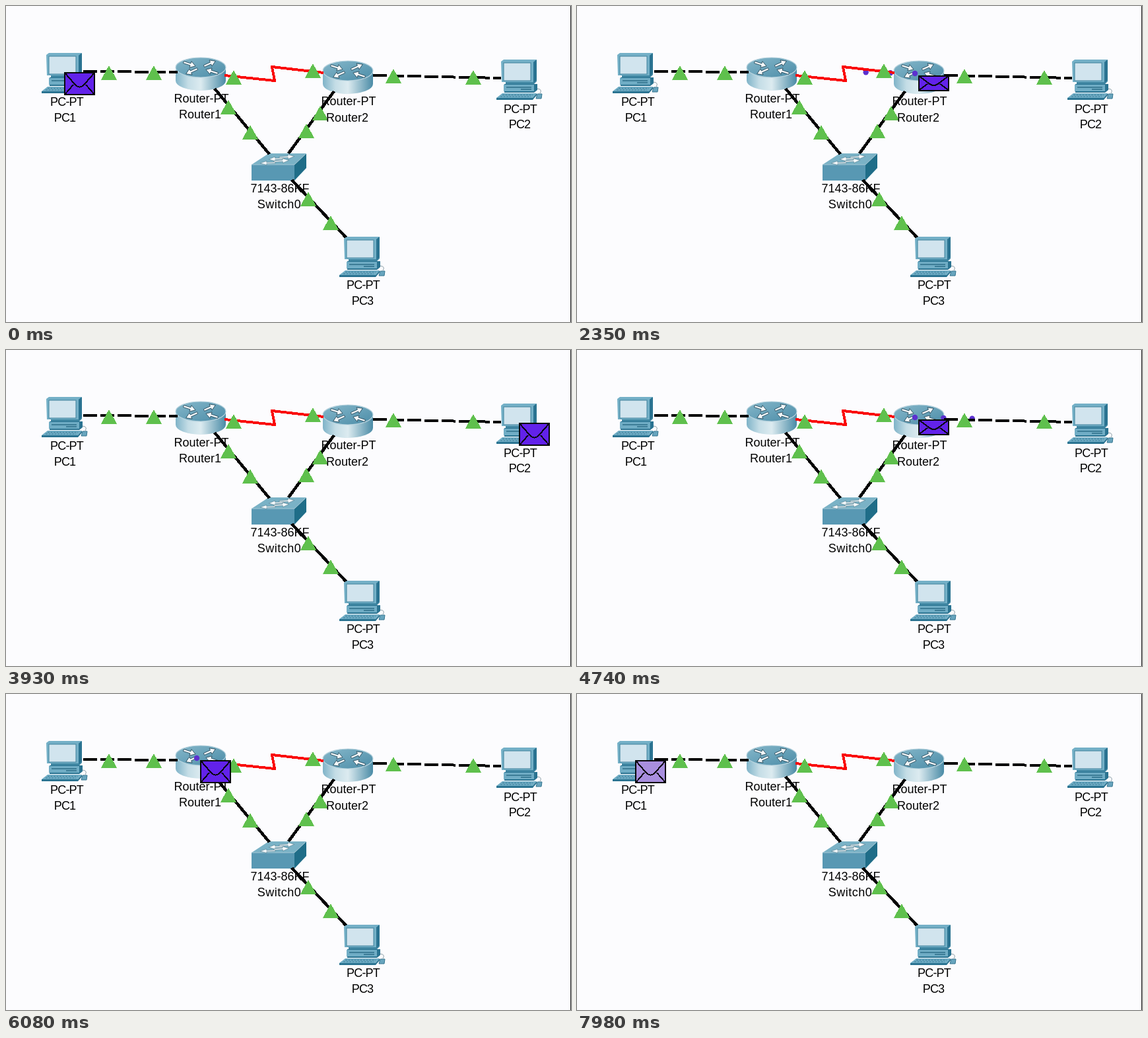
These frames come from a looping animation (856x478 px, 8000 ms). An HTML page:

```html
<!DOCTYPE html>
<html lang="en">
<head>
<meta charset="utf-8">
<title>Packet trip</title>
<style>
html, body { margin: 0; width: 100%; height: 100%; overflow: hidden; background: #fcfcfe; }
svg { display: block; width: 856px; height: 478px; }
text { font: 18px "Liberation Sans", Arial, sans-serif; text-anchor: middle; fill: #000; }
.pc { letter-spacing: -.8px; }
.wide { letter-spacing: .5px; }
.crisp { shape-rendering: crispEdges; }
.cable { fill: none; stroke: #000; stroke-width: 4.5; }
.dashed { stroke-width: 4; stroke-dasharray: 21 5; }
.serial { stroke: #fa0808; stroke-width: 4; }
.ink { stroke: #08080c; stroke-width: 2; }
#ghost { fill: #fff; stroke-dasharray: 3 3; }
#letter path { vector-effect: non-scaling-stroke; }
#leds { fill: #5fc04d; }
#dots { fill: #5c30cf; }
</style>
</head>
<body>
<svg viewBox="0 0 856 478">
  <defs>
    <linearGradient id="metal">
      <stop offset="0" stop-color="#7fb3c8"/>
      <stop offset=".25" stop-color="#c4dde6"/>
      <stop offset=".5" stop-color="#dcebf0"/>
      <stop offset="1" stop-color="#4a8ba6"/>
    </linearGradient>
    <linearGradient id="lid" x2="1" y2="1">
      <stop offset="0" stop-color="#85b7ca"/>
      <stop offset="1" stop-color="#4c8da8"/>
    </linearGradient>

    <g id="pc">
      <path fill="#3f86a2" d="M8 1H54V33L49 38H7V30Z"/>
      <path fill="#74b0c7" d="M0 3L4 0H54L49 4V34H1Z"/>
      <path fill="#2a7391" d="M49 4L54 0V31L49 35Z"/>
      <rect x="4" y="5" width="41" height="27" fill="#d1e4ee" stroke="#3f819c"/>
      <path fill="#2a7391" d="M5 37H55V46L50 50H5Z"/>
      <path fill="#70adc5" d="M4 38H50V48H4Z"/>
      <path d="M8 42H46M30 45H46" stroke="#2d6d89" stroke-width="1.5"/>
      <path fill="#70adc5" d="M2 51H54L48 58H-7Z"/>
      <path fill="#2a7391" d="M-7 58H48L54 51V54L48 61H-7Z"/>
      <path d="M2 53.5H48M-1 56H45" stroke="#3b7c98" stroke-dasharray="3 1.5"/>
      <path d="M55 44Q63 45 59 51" fill="none" stroke="#8a9da6"/>
      <path fill="#68a5be" stroke="#34748f" d="M55 52H62L61 59H53Z"/>
    </g>

    <path id="arrow" d="M0 -1.6H11V-5L19 0L11 5V1.6H0Z"/>

    <g id="router">
      <path fill="url(#metal)" d="M-38 0V20A38 15 0 0 0 38 20V0Z"/>
      <ellipse rx="38" ry="15" fill="url(#lid)" stroke="#b8d3de" stroke-width="1.2"/>
      <g fill="#f4f8fa" stroke="#26495a" stroke-width=".8">
        <use href="#arrow" transform="translate(-26 -8) rotate(18)"/>
        <use href="#arrow" transform="translate(26 9) rotate(198)"/>
        <use href="#arrow" transform="translate(5 -2) rotate(-24)"/>
        <use href="#arrow" transform="translate(-5 2) rotate(156)"/>
      </g>
    </g>

    <g id="switch">
      <path fill="#7ab2c6" d="M372 240L398 223H455L437 240Z"/>
      <path fill="#5898b3" d="M372 240H437V264H372Z"/>
      <path fill="#1f6d88" d="M437 240L455 223V245L437 264Z"/>
      <path d="M372 240H437L455 223" fill="none" stroke="#a5c8d5"/>
      <g fill="#f4f8fa" stroke="#4a7688" stroke-width=".6">
        <use href="#arrow" transform="translate(414 229) rotate(-4) scale(1.2 .7)"/>
        <use href="#arrow" transform="translate(421 231) rotate(178) scale(1.2 .7)"/>
        <use href="#arrow" transform="translate(406 235) rotate(-4) scale(1.2 .7)"/>
        <use href="#arrow" transform="translate(408 237) rotate(178) scale(1.2 .6)"/>
      </g>
    </g>

    <g id="letter">
      <path d="M1 1H46V34H1Z"/>
      <path fill="none" d="M1 1L15 17Q23.5 28 32 17L46 1M1 34L14 19M46 34L33 19"/>
    </g>
  </defs>

  <rect width="856" height="478" fill="#fcfcfe"/>
  <path d="M855.5 0V478" stroke="#222"/>

  <use href="#pc" x="61" y="71"/>
  <use href="#pc" x="750" y="81"/>
  <use href="#pc" x="512" y="349"/>
  <use href="#router" x="295" y="93"/>
  <use href="#router" x="518" y="98"/>
  <use href="#switch"/>

  <g id="dots"></g>

  <g class="crisp">
    <path class="cable dashed" d="M117 99L260 100"/>
    <path class="cable dashed" d="M556 105L750 109"/>
    <path class="cable serial" d="M331 105L407 113L403 92L481 101"/>
    <path class="cable" d="M316 125L399 224"/>
    <path class="cable" d="M497 129L428 223"/>
    <path class="cable" d="M433 263L515 350"/>
    <g id="leds"></g>
  </g>
  <g id="labels"></g>

  <g id="solid" class="ink crisp"><use href="#letter"/></g>
  <g id="ghost" class="ink crisp"><use href="#letter"/></g>
</svg>
<script>
const LOOP = 8000, W = 47, H = 35, HOPS = 6, TICK = 40;
const $ = id => document.getElementById(id);

const pc1 = [88, 100], r1 = [294, 100], r2 = [517, 105], pc2 = [777, 110];
const trips = [
  { at: 770, from: pc1, to: r1 },
  { at: 1990, from: r1, to: r2 },
  { at: 3160, from: r2, to: pc2 },
  { at: 4380, from: pc2, to: r2 },
  { at: 5550, from: r2, to: r1 },
  { at: 6770, from: r1, to: pc1 }
];

function add(parent, tag, attrs, content = '') {
  const el = document.createElementNS('http://www.w3.org/2000/svg', tag);
  for (const key in attrs) el.setAttribute(key, attrs[key]);
  el.textContent = content;
  return $(parent).appendChild(el);
}

[[156, 90], [224, 90], [345, 97], [465, 87], [587, 95], [708, 97],
 [337, 142], [370, 180], [476, 151], [455, 178], [458, 281], [492, 317]]
  .forEach(([x, y]) => add('leds', 'path', { d: `M${x} ${y}l12 21.5h-24z` }));

[['PC-PT', 92, 151, 'pc'], ['PC1', 89, 175, 'pc'],
 ['Router-PT', 296, 146, ''], ['Router1', 294, 170, ''],
 ['Router-PT', 519, 150, ''], ['Router2', 517, 175, ''],
 ['PC-PT', 779, 162, 'pc'], ['PC2', 778, 185, 'pc'],
 ['7143-86KF', 415, 282, ''], ['Switch0', 414, 306, 'wide'],
 ['PC-PT', 541, 428, 'pc'], ['PC3', 540, 452, 'pc']]
  .forEach(([s, x, y, c]) => add('labels', 'text', { x, y, class: c }, s));

const dots = Array.from({ length: HOPS + 1 }, () => add('dots', 'circle', { r: 4.2 }));

const clamp = v => Math.max(0, Math.min(1, v));
const mix = (a, b, k) => a + (b - a) * k;
const along = (trip, k) => [0, 1].map(i => mix(trip.from[i], trip.to[i], k));

function place(id, x, y, k, shown = true) {
  $(id).setAttribute('transform', `translate(${x} ${y}) scale(1 ${Math.max(k, .001)})`);
  $(id).style.display = shown && k > .02 ? '' : 'none';
}

function draw(t) {
  const trip = trips.filter(p => p.at <= t).pop() || { at: -LOOP, from: r1, to: pc1 };
  const age = Math.floor((t - trip.at) / TICK) * TICK;

  // the outline travels first, then the letter unrolls at the far end
  const moving = age < 200;
  const [gx, gy] = along(trip, clamp(age / 180)).map(Math.round);
  place('ghost', gx, gy, 1, moving);
  if (moving) {
    const k = 1 - (age / 240) ** 2;
    place('solid', trip.from[0] - W, trip.from[1] + H * (1 - k), k);
  } else {
    place('solid', trip.to[0], trip.to[1], clamp((age - 200) / 240));
  }

  dots.forEach((dot, i) => {
    const [x, y] = along(trip, i / HOPS);
    dot.setAttribute('cx', x - 5);
    dot.setAttribute('cy', y - 3);
    dot.style.display = age > 0 && age >= i * 30 && age < 100 + i * 80 ? '' : 'none';
  });

  const fade = clamp((t - 7580) / 400);
  const rgb = [[98, 34, 234], [168, 142, 222]];
  $('solid').style.fill = `rgb(${rgb[0].map((c, i) => Math.round(mix(c, rgb[1][i], fade)))})`;
}

const begin = performance.now();
function frame() {
  draw((performance.now() - begin) % LOOP);
  requestAnimationFrame(frame);
}
frame();
</script>
</body>
</html>
```
